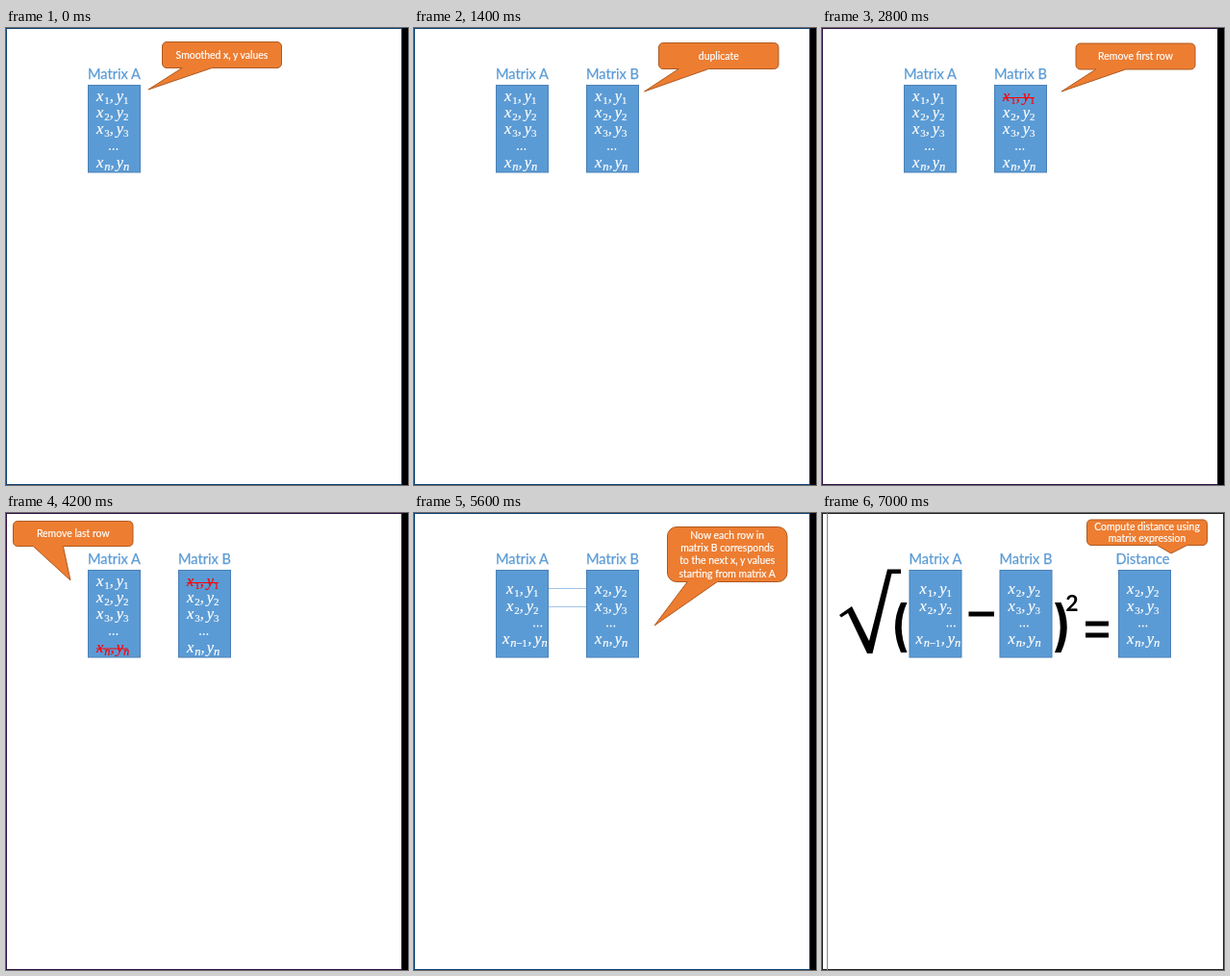
These frames come from a looping animation (418 by 475 pixels, 8 s). An HTML page:

```html
<!DOCTYPE html>
<html lang="en">
<head>
<meta charset="utf-8">
<title>Matrix distance</title>
<style>
  html, body { margin: 0; width: 100%; height: 100%; overflow: hidden; background: #fff; }
  svg { display: block; }
  text { font-family: Lato, sans-serif; text-anchor: middle; }
  .title { font-size: 14.6px; fill: #5b9bd5; stroke: #5b9bd5; stroke-width: .25; }
  .note { font-size: 10.45px; fill: #fff; stroke: #fff; stroke-width: .2; }
  .math { fill: #fff; stroke: #fff; }
  .math.cut { fill: #f00; stroke: #f00; }
  .math text { font: italic 16.5px "Liberation Serif", serif; text-anchor: start; stroke-width: .2; }
  .math .sub { font-size: 12.5px; }
  .math .digit { font-style: normal; font-size: 11px; }
</style>
</head>
<body>
<svg id="stage" width="418" height="475" viewBox="0 0 418 475"></svg>
<script>
const STEP = 1400, LOOP = 8000;
const stage = document.getElementById('stage');

const text = (x, y, str, cls) => `<text x="${x}" y="${y}" class="${cls}">${str}</text>`;
const line = (x1, y1, x2, y2, color) =>
  `<path d="M${x1} ${y1}L${x2} ${y2}" stroke="${color}" stroke-width="1"/>`;
const frame = (color, width = 411) =>
  `<rect x=".5" y=".5" width="${width}" height="474" fill="none" stroke="${color}"/>`;
const strip = '<rect x="412" width="6" height="475"/>';

// One "x_i, y_j" entry with its left edge at x
function pair(x, y, i, j = i, cut = false) {
  const sub = (dx, s) => [...s].map((c, k) =>
    text(x + dx + k * 6, y + 3, c, c === 'n' ? 'sub' : 'sub digit')).join('');
  const gap = i.length > 1 ? 12.5 : 0;
  const strike = cut ? line(x, y - 3.5, x + 33, y - 3.5, '#f00') : '';
  return `<g class="math${cut ? ' cut' : ''}">` +
    text(x, y, 'x', '') + sub(8.2, i) +
    text(x + (i === 'n' ? 14.5 : 13.7) + gap, y, ',', '') +
    text(x + 20.8 + gap, y, 'y', '') + sub(28 + gap, j) + strike + '</g>';
}

const dots = (x, y) => [1, 4.7, 8.4].map(d =>
  `<circle cx="${x + d}" cy="${y}" r=".9" fill="#fff"/>`).join('');

const box = (x, name, rows, middle = x + 27) =>
  text(middle, 53, name, 'title') +
  `<rect x="${x}" y="59.5" width="54" height="90.5" fill="#5b9bd5" stroke="#4a80b6"/>` + rows;

// All five rows, optionally striking the first or the last
const full = (x, name, cutFirst, cutLast) => box(x, name,
  pair(x + 8.5, 76, '1', '1', cutFirst) + pair(x + 8.5, 93, '2') +
  pair(x + 8.5, 110, '3') + dots(x + 21.5, 126) + pair(x + 8.5, 144.5, 'n', 'n', cutLast));

const head = x => box(x, 'Matrix A',
  pair(x + 10.5, 83.5, '1') + pair(x + 10.5, 101.5, '2') +
  dots(x + 38.5, 117.5) + pair(x + 6.5, 136, 'n−1', 'n'));

const tail = (x, name, middle) => box(x, name,
  pair(x + 8.5, 83.5, '2') + pair(x + 8.5, 101.5, '3') +
  dots(x + 20.5, 117.5) + pair(x + 8.5, 136, 'n'), middle);

// Rounded speech bubble, its pointer based on the lower edge
function callout(x, y, w, h, tipX, tipY, lines, leading = 13.2) {
  const r = h / 6, right = x + w, bottom = y + h;
  const base = x + w * (tipX > x + w / 2 ? 7 / 12 : 1 / 6);
  const first = y + h / 2 + 3.8 - (lines.length - 1) * leading / 2;
  return `<path d="M${x + r} ${y}H${right - r}a${r} ${r} 0 0 1 ${r} ${r}V${bottom - r}
    a${r} ${r} 0 0 1 ${-r} ${r}H${base + w / 4}L${tipX} ${tipY}L${base} ${bottom}H${x + r}
    a${r} ${r} 0 0 1 ${-r} ${-r}V${y + r}a${r} ${r} 0 0 1 ${r} ${-r}Z"
    fill="#ed7d31" stroke="#ae5a21"/>` +
    lines.map((s, i) => text(x + w / 2, first + i * leading, s, 'note')).join('');
}

const formula = `<path d="M18 106L31 97L49 133L68 58.5H82V63H72.5L52.5 146H47L27 104L20 108.5Z
  M82 93H88.5Q77 118 88.5 145H82Q70 118 82 93Z
  M248.5 93H242Q253.5 118 242 145H248.5Q261 118 248.5 93Z
  M152.500 102.500h26.500v5h-26.500z M274 112.500h24v5h-24z M274 124.500h24v5h-24z"/>
  <text x="260" y="101.5" font-size="23" font-weight="700">2</text>`;

const A = 85.5, B = 179.5, NAVY = '#0f4478', PURPLE = '#34124a', WIRE = '#a3c5e6';

const scenes = [
  frame(NAVY) + strip + full(A, 'Matrix A') +
    callout(162.5, 14.5, 124, 27, 148, 64, ['Smoothed x, y values']),

  frame(NAVY) + strip + full(A, 'Matrix A') + full(B, 'Matrix B') +
    callout(254.5, 15.5, 124.5, 27, 239.5, 66, ['duplicate']),

  frame(PURPLE) + strip + full(A, 'Matrix A') + full(B, 'Matrix B', true) +
    callout(264, 16, 124, 27, 249, 66, ['Remove first row']),

  frame(PURPLE) + strip + full(A, 'Matrix A', false, true) + full(B, 'Matrix B', true) +
    callout(7.5, 8.5, 124.5, 26, 67, 70, ['Remove last row']),

  frame(NAVY) + strip + head(A) + tail(B, 'Matrix B') +
    line(140, 78.5, 179, 78.5, WIRE) + line(140, 97.5, 179, 97.5, WIRE) +
    callout(263.5, 14.5, 124.5, 57, 250, 117,
      ['Now each row in', 'matrix B corresponds', 'to the next x, y values', 'starting from matrix A']),

  frame('#222', 417) + line(5.5, 0, 5.5, 475, '#888') + formula +
    head(A + 5.5) + tail(B + 5.5, 'Matrix B') + tail(B + 129, 'Distance', 333.5) +
    callout(275.5, 7, 125, 26.5, 363, 42, ['Compute distance using', 'matrix expression'], 12.5)
];

let shown = -1;
function draw() {
  const index = Math.floor(performance.now() % LOOP / STEP);
  if (index !== shown) stage.innerHTML = scenes[shown = index];
  requestAnimationFrame(draw);
}
draw();
</script>
</body>
</html>
```
